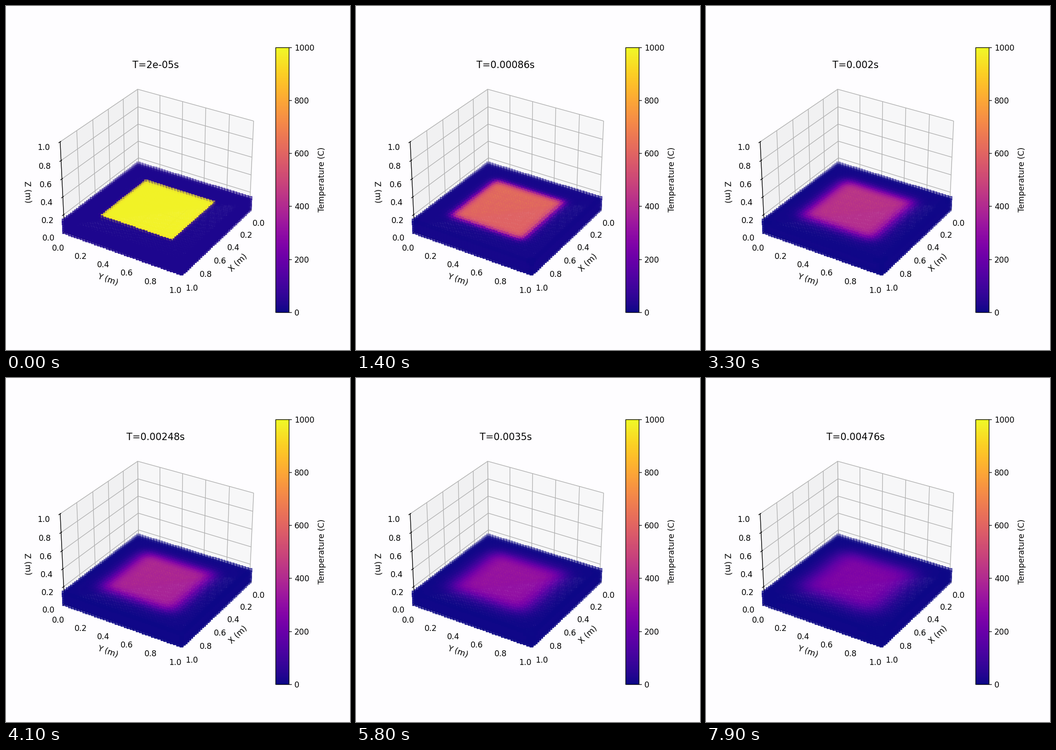
These frames come from a looping animation (748x748 px, 8000 ms). A matplotlib script:

```python
import numpy as np
import matplotlib.pyplot as plt
from matplotlib.animation import FuncAnimation

PAPER = "#fefdff"
N, LAYERS = 40, 6            # grid points along x and y, and along z
H = 1 / (N - 1)
DT, RATE = 2e-5, 0.0168      # time step, diffusion number per step
FRAMES, STRIDE = 80, 3


def diffuse(t):
    """One explicit heat step; the surroundings stay at zero."""
    p = np.pad(t, 1)
    near = (p[2:, 1:-1, 1:-1] + p[:-2, 1:-1, 1:-1]
            + p[1:-1, 2:, 1:-1] + p[1:-1, :-2, 1:-1]
            + p[1:-1, 1:-1, 2:] + p[1:-1, 1:-1, :-2])
    return t + RATE * (near - 6 * t)


# Points that can be seen, plus what shows through the translucent markers
i, j, k = np.indices((N, N, LAYERS))
top = LAYERS - 1
shell = ((k == top) | ((k == top - 1) & (i + j < N))
         | (i >= N - 2) | (j >= N - 2) | (i == 0) | (j == 0))

temp = np.full((N, N, LAYERS), 25.0)
lo, hi = N // 5, N - N // 5
temp[lo:hi, lo:hi] = 1000
temp = diffuse(temp)
history = []
for _ in range(FRAMES):
    history.append(temp[shell])
    for _ in range(STRIDE):
        temp = diffuse(temp)

fig = plt.figure(figsize=(6, 6), dpi=748 / 6, facecolor=PAPER)
ax = fig.add_subplot(projection="3d", facecolor=PAPER)
ax.view_init(elev=30, azim=32)
cloud = ax.scatter(i[shell] * H, j[shell] * H, k[shell] * H, c=history[0],
                   marker="s", s=20, cmap="plasma", vmin=0, vmax=1000)
ax.set(xlim=(0, 1), ylim=(0, 1), zlim=(0, 1),
       xlabel="X (m)", ylabel="Y (m)", zlabel="Z (m)")
fig.colorbar(cloud, ax=ax, label="Temperature (C)")
title = ax.set_title("")


def update(n):
    cloud.set_array(history[n])
    title.set_text(f"T={round(DT * (1 + STRIDE * n), 5)}s")
    return cloud, title


anim = FuncAnimation(fig, update, frames=FRAMES, interval=100,
                     repeat=True, repeat_delay=0, blit=False)
plt.show()
```
